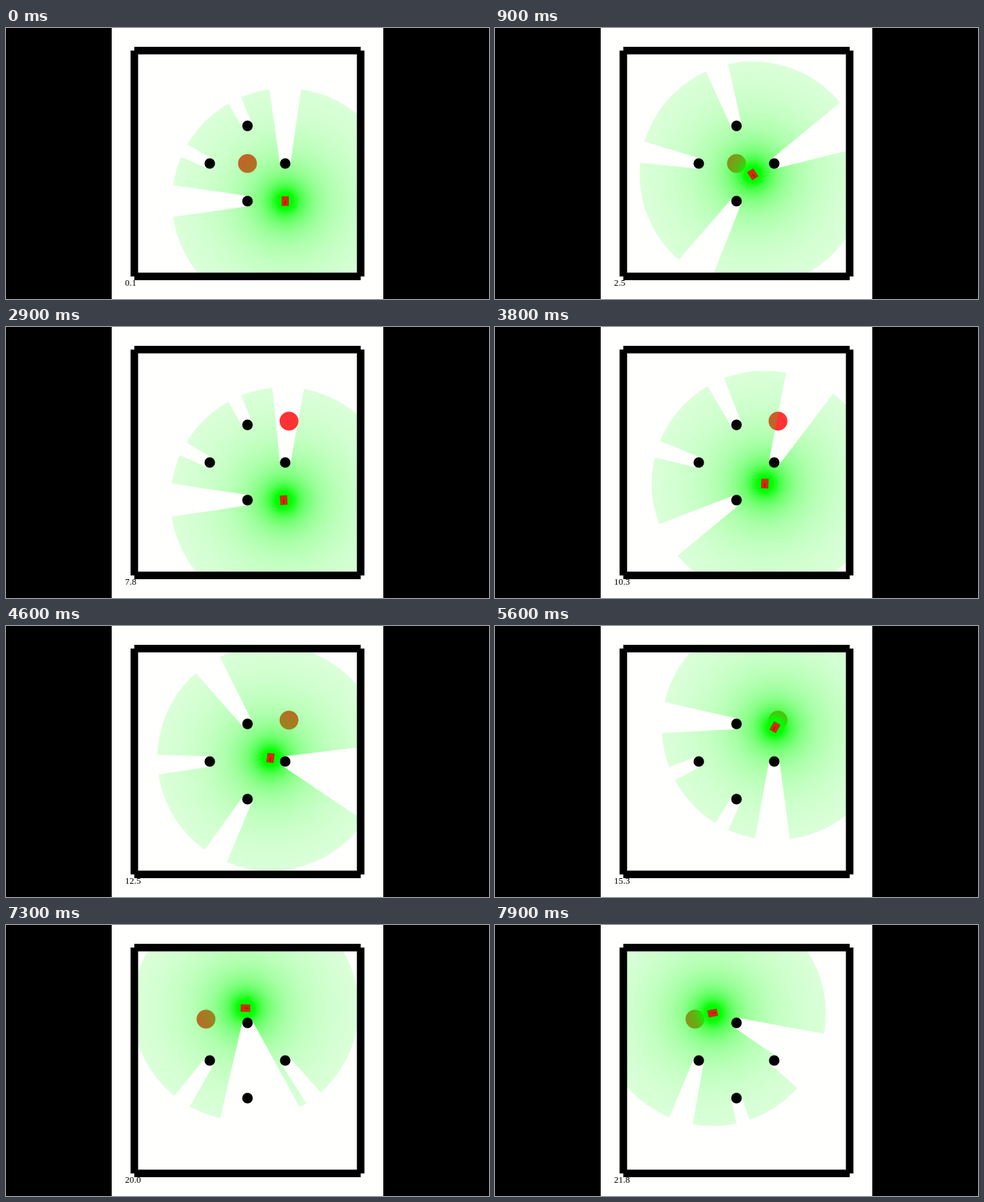
These frames come from a looping animation (690x388 px, 8 s). An HTML page with a canvas:

```html
<!DOCTYPE html>
<html lang="en">
<head>
<meta charset="utf-8">
<title>Robot and range sensor</title>
<style>
  html, body { margin: 0; width: 100%; height: 100%; overflow: hidden; background: #000; }
  canvas { display: block; width: 690px; height: 388px; }
</style>
</head>
<body>
<canvas id="stage" width="690" height="388"></canvas>
<script>
const ctx = document.getElementById('stage').getContext('2d');
const LOOP = 8000, STEP = 100;

// World units, measured from the centre of the room
const VIEW = 360, ROOM = 150, WALL = 10, REACH = 150, POST_R = 7, GOAL_R = 12.5;
const RAD = Math.PI / 180;

const poses = [
  { t: 0,    x: 50,    y: 50,    turn: -90,  speed: .045, clock: .1 },
  { t: 1450, x: 8,     y: 6,     turn: -139, speed: 0,    clock: 3.9 },
  { t: 2900, x: 48,    y: 50,    turn: -94,  speed: 0,    clock: 7.8 },
  { t: 4600, x: 30.5,  y: -4.7,  turn: -83,  speed: .035, clock: 12.5 },
  { t: 5600, x: 51,    y: -45.5, turn: -60,  speed: .045, clock: 15.3 },
  { t: 6600, x: 30.5,  y: -69,   turn: -160, speed: .045, clock: 18 },
  { t: 7900, x: -31.5, y: -63,   turn: -192, speed: .045, clock: 21.8 }
];
const goals = [
  { t: 0,    x: 0,   y: 0 },
  { t: 1450, x: 55,  y: 55 },
  { t: 2800, x: 55,  y: -55 },
  { t: 5850, x: -55, y: -55 }
];
const posts = [0, 90, 180, 270].map(a => ({ x: 50 * Math.cos(a * RAD), y: 50 * Math.sin(a * RAD) }));

// Each leg is a Hermite curve that leaves and arrives along the heading.
function poseAt(t) {
  const i = Math.max(1, poses.findIndex(p => p.t >= t));
  const a = poses[i - 1], b = poses[i];
  const span = b.t - a.t, u = (t - a.t) / span, v = 1 - u;
  const ease = u * u * (3 - 2 * u);
  const curve = (key, dir) => a[key] + (b[key] - a[key]) * ease
    + span * u * v * (a.speed * dir(a.turn * RAD) * v - b.speed * dir(b.turn * RAD) * u);
  return {
    x: curve('x', Math.cos),
    y: curve('y', Math.sin),
    turn: a.turn + (b.turn - a.turn) * ease,
    clock: a.clock + (b.clock - a.clock) * u
  };
}

function disc(x, y, r, fill) {
  ctx.beginPath();
  ctx.arc(x, y, r, 0, Math.PI * 2);
  ctx.fillStyle = fill;
  ctx.fill();
}

// Rectangle around a centre
function box(x, y, w, h, fill) {
  ctx.fillStyle = fill;
  ctx.fillRect(x - w / 2, y - h / 2, w, h);
}

function cutShadow(x, y, post) {
  const dist = Math.hypot(post.x - x, post.y - y);
  const mid = Math.atan2(post.y - y, post.x - x);
  const half = Math.asin(Math.min(1, POST_R / dist));
  const near = dist * Math.cos(half), far = REACH * 1.6;
  const point = (side, r) => [x + r * Math.cos(mid + side * half), y + r * Math.sin(mid + side * half)];
  ctx.beginPath();
  ctx.rect(-VIEW, -VIEW, VIEW * 2, VIEW * 2);
  ctx.moveTo(...point(-1, near));
  ctx.lineTo(...point(-1, far));
  ctx.lineTo(...point(1, far));
  ctx.lineTo(...point(1, near));
  ctx.closePath();
  ctx.clip('evenodd');
}

function drawLight(x, y) {
  const inner = ROOM - WALL / 2;
  ctx.save();
  ctx.beginPath();
  ctx.rect(-inner, -inner, inner * 2, inner * 2);
  ctx.clip();
  posts.forEach(p => cutShadow(x, y, p));
  const glow = ctx.createRadialGradient(x, y, 0, x, y, REACH);
  for (let d = 0; d <= REACH; d += 5) {
    glow.addColorStop(d / REACH, `rgba(0,255,0,${Math.min(1, 23 / (d + 12))})`);
  }
  disc(x, y, REACH, glow);
  ctx.restore();
}

function drawRobot({ x, y, turn }) {
  ctx.save();
  ctx.translate(x, y);
  ctx.rotate(turn * RAD);
  box(0, 0, 12.6, 9.6, '#a03c08');
  box(0, 0, 11.6, 8.6, '#d72a08');
  box(-2, 0, 5, .8, '#701804');
  ctx.restore();
}

function draw(t) {
  const robot = poseAt(t);
  const goal = goals.filter(g => g.t <= t).pop();
  const scale = 388 / VIEW;

  ctx.setTransform(scale, 0, 0, scale, 345, 194);
  box(0, 0, VIEW * 2, VIEW, '#000');
  box(0, 0, VIEW, VIEW, '#fffffd');
  disc(goal.x, goal.y, GOAL_R, '#ff3333');
  drawLight(robot.x, robot.y);
  posts.forEach(p => disc(p.x, p.y, POST_R, '#000'));
  drawRobot(robot);

  for (const side of [-ROOM, ROOM]) {
    box(0, side, ROOM * 2, WALL, '#000');
    box(side, 0, WALL, ROOM * 2, '#000');
  }

  ctx.fillStyle = '#000';
  ctx.font = '12px "Liberation Serif", serif';
  ctx.fillText(robot.clock.toFixed(1), -162.4, 162.4);
}

const start = performance.now();
function tick() {
  const t = (performance.now() - start) % LOOP;
  draw(Math.floor(t / STEP) * STEP);
  requestAnimationFrame(tick);
}
tick();
</script>
</body>
</html>
```
